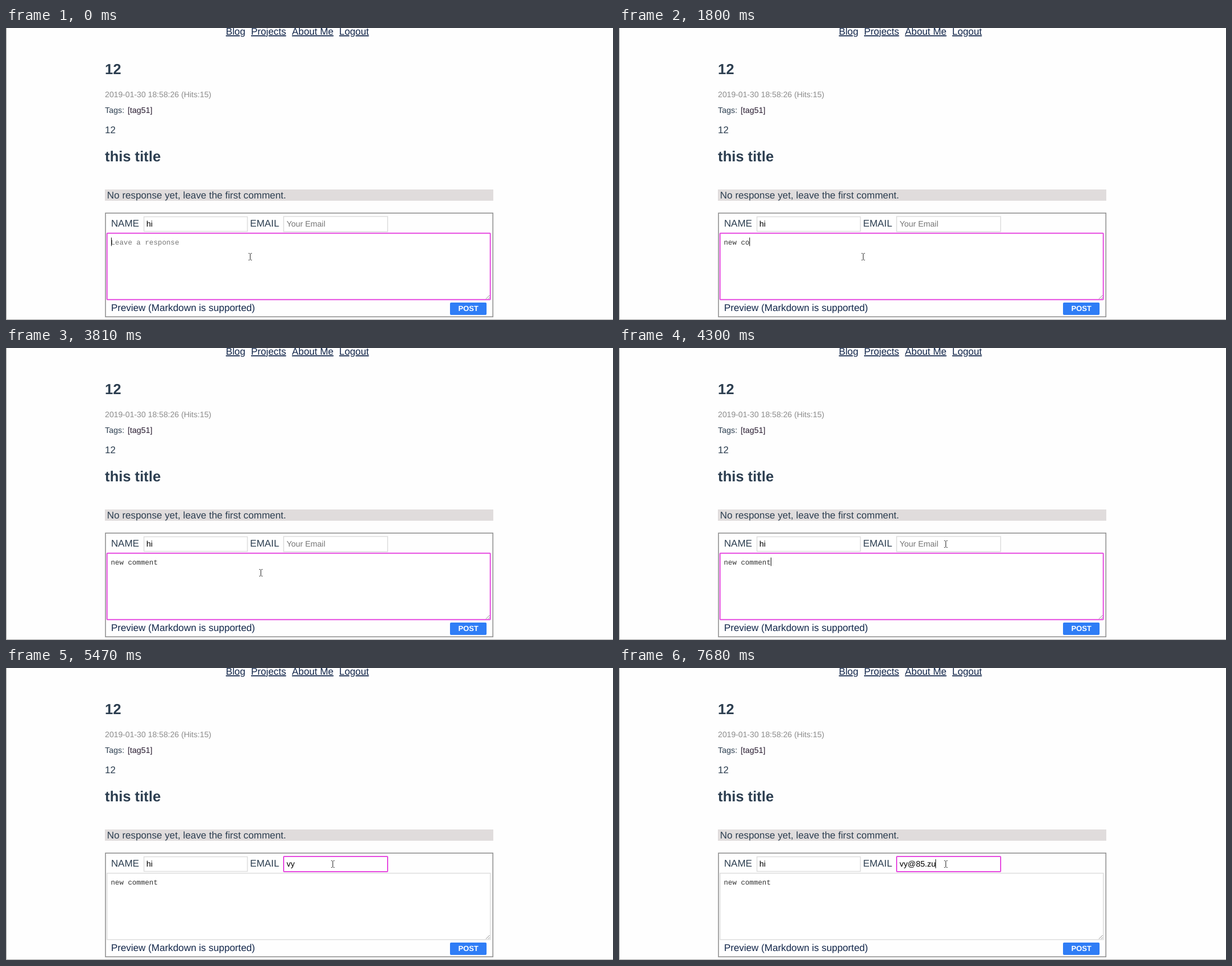
An HTML page for the animation above (8 s loop, 1080 px wide and 519 px high).

```html
<!DOCTYPE html>
<html lang="en">
<head>
<meta charset="utf-8">
<title>Comment form</title>
<style>
  html, body { margin: 0; width: 100%; height: 100%; overflow: hidden; background: #fefefe; }
  svg { display: block; }
  text { font: 17.28px "Liberation Sans", Arial, sans-serif; fill: #2c3e50; text-rendering: geometricPrecision; white-space: pre; }
  .small { font-size: 14.4px; }
  .title { font-size: 25.92px; font-weight: bold; }
  .link { fill: #12264a; }
  .nav { text-decoration: underline; }
  .field { font-size: 14.4px; fill: #000; }
  .mono { font: 12.667px "Liberation Mono", "Courier New", monospace; fill: #333; }
  .hint { fill: #777; }
  .box { fill: #fff; stroke: #ddd; stroke-width: 1.5; }
  .focus { stroke: #e64be0; stroke-width: 2; }
</style>
</head>
<body>
<svg width="1080" height="519" viewBox="0 0 1080 519">
  <rect width="1080" height="519" fill="#fefefe"/>
  <path d="M.5 0V518.5H1080" fill="none" stroke="#a0a0a0"/>

  <g>
    <text class="link nav" x="391.2" y="12">Blog</text>
    <text class="link nav" x="436" y="12">Projects</text>
    <text class="link nav" x="508.8" y="12">About Me</text>
    <text class="link nav" x="592.8" y="12">Logout</text>
  </g>

  <text class="title" x="176" y="82">12</text>
  <text x="176" y="123" style="font-size:14.2px;fill:#8c8c8c">2019-01-30 18:58:26 (Hits:15)</text>
  <text class="small" x="176" y="151">Tags:</text>
  <text class="small" x="216.6" y="151" style="fill:#26192e">[tag51]</text>
  <text x="176" y="187">12</text>
  <text class="title" x="176" y="237">this title</text>

  <rect x="176" y="287" width="691" height="20" fill="#e0dcdc"/>
  <text x="179.8" y="302.5">No response yet, leave the first comment.</text>

  <rect x="177" y="329" width="689.3" height="184.3" fill="none" stroke="#909090" stroke-width="1.6"/>
  <text x="186.9" y="353">NAME</text>
  <rect class="box" x="245.5" y="335.5" width="184" height="26"/>
  <text class="field" x="249.8" y="353">hi</text>
  <text x="434.2" y="353">EMAIL</text>

  <rect id="emailBox" class="box" x="494" y="335" width="185" height="27"/>
  <text id="email" class="field" x="499.2" y="353"></text>
  <rect id="noteBox" class="box" x="179.7" y="364.7" width="682" height="118"/>
  <text id="note" class="mono" x="186.5" y="385"></text>
  <path d="M854 481.5L860.5 475M858 481.5L860.5 479" stroke="#777" stroke-width=".9"/>

  <text class="link" x="186.9" y="503">Preview (Markdown is supported)</text>
  <rect x="790" y="488" width="65" height="22" rx="2" fill="#2f7df6"/>
  <text x="822.7" y="503.3" text-anchor="middle" style="font-size:13.2px;font-weight:bold;fill:#fff">POST</text>

  <rect id="caret" width="1" fill="#111"/>
  <path id="mouse" d="M-3 -5.5H-1M1 -5.5H3M-3 6.5H-1M1 6.5H3M0 -5V6" fill="none" stroke="#333" stroke-width="1.1"/>
</svg>
<script>
const LOOP = 8000, FOCUS_EMAIL = 4350;
const NOTE = 'new comment', EMAIL = 'vy@85.zu';
const el = id => document.getElementById(id);
const [emailBox, email, noteBox, note, caret, mouse] =
  ['emailBox', 'email', 'noteBox', 'note', 'caret', 'mouse'].map(el);

// [time, characters typed, caret visible]
const noteKeys = [
  [0, 0, 1], [240, 0, 0], [530, 2, 1], [640, 3, 1], [880, 4, 1], [1260, 5, 1],
  [1740, 5, 0], [1800, 6, 1], [2290, 6, 0], [2600, 7, 1], [2780, 8, 1],
  [2970, 9, 1], [3090, 10, 1], [3270, 11, 1], [3770, 11, 0], [4270, 11, 1]
];
const emailKeys = [
  [0, 0, 1], [4780, 1, 1], [4910, 2, 1], [5470, 2, 0], [5720, 3, 1], [5880, 4, 1],
  [6060, 5, 1], [6480, 6, 1], [6600, 7, 1], [7160, 7, 0], [7680, 8, 1]
];

const at = (keys, t) => keys.findLast(k => k[0] <= t);

function show(node, full, hint, count) {
  node.textContent = count ? full.slice(0, count) : hint;
  node.classList.toggle('hint', !count);
}

function put(node, attrs) {
  for (const name in attrs) node.setAttribute(name, attrs[name]);
}

function draw(t) {
  const onEmail = t >= FOCUS_EMAIL;
  const [, noteCount, noteOn] = at(noteKeys, t);
  const [, emailCount, emailOn] = at(emailKeys, t);
  show(note, NOTE, 'Leave a response', noteCount);
  show(email, EMAIL, 'Your Email', emailCount);

  noteBox.classList.toggle('focus', !onEmail);
  emailBox.classList.toggle('focus', onEmail);
  put(noteBox, { rx: onEmail ? 0 : 1 });
  put(emailBox, { rx: onEmail ? 1 : 0 });

  const emailWidth = emailCount ? email.getComputedTextLength() : 0;
  put(caret, onEmail
    ? { x: Math.floor(499.2 + emailWidth), y: 340, height: 16, opacity: emailOn }
    : { x: Math.max(187, Math.floor(186.5 + 7.6 * noteCount)), y: 372.5, height: 15, opacity: noteOn });

  // The pointer is sampled every 60 ms while it travels.
  const step = t < 3700 ? 0 : Math.min(1, (Math.floor((t - 3700) / 60) + 1) / 9);
  const p = step * step * (3 - 2 * step);
  const x = Math.round(434 + 147 * p) + .5, y = Math.round(406 - 58 * p);
  put(mouse, { transform: `translate(${x} ${y})` });
}

const start = performance.now();
function tick() {
  draw((performance.now() - start) % LOOP);
  requestAnimationFrame(tick);
}
tick();
</script>
</body>
</html>
```
